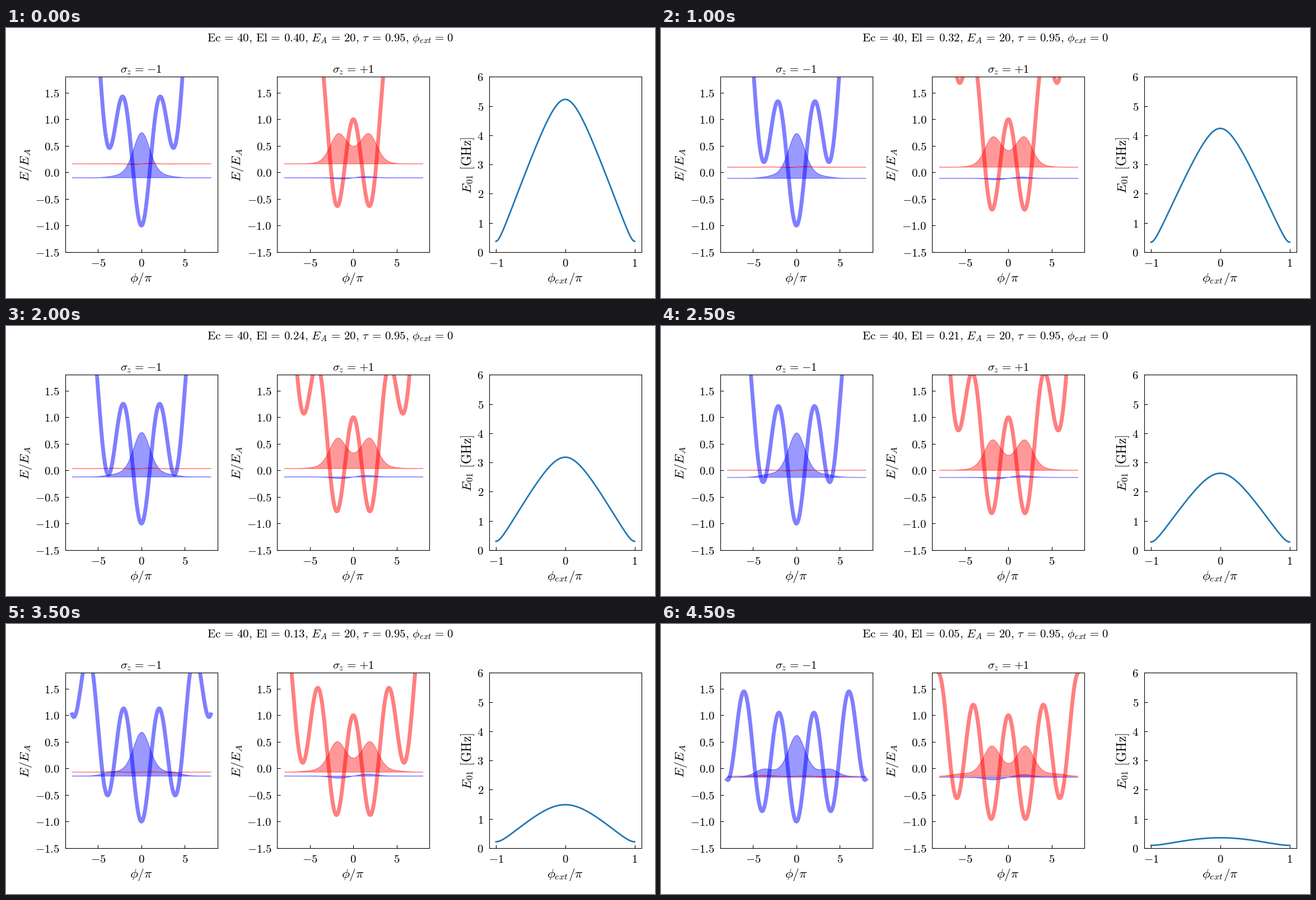
These frames come from a looping animation (1159x483 px, 5000 ms). A matplotlib script:

```python
import numpy as np
import matplotlib.pyplot as plt
from matplotlib.animation import FuncAnimation

W, H, DPI = 1159, 483, 100
FRAMES, INTERVAL = 10, 500

plt.rcParams["mathtext.fontset"] = "cm"

# Circuit parameters, energies in GHz
EC, EA, TAU = 40, 20, 0.95
EL_VALUES = np.linspace(0.40, 0.05, FRAMES)

# Sine basis in a box of half-width 8 pi
HALF, MODES = 8 * np.pi, 64
phi = np.linspace(-HALF, HALF, 401)
step = phi[1] - phi[0]
wave_k = np.arange(1, MODES + 1) * np.pi / (2 * HALF)
basis = np.sin(wave_k[:, None] * (phi + HALF)) / np.sqrt(HALF)


def operator(values):
    return (basis * values) @ basis.T * step


def both_spins(matrix):
    return np.kron(np.eye(2), matrix)


kinetic = np.diag(4 * EC * wave_k**2)
phi_1 = both_spins(operator(phi))
phi_2 = both_spins(operator(phi**2))
well = EA * operator(np.cos(phi / 2))
mixing = -EA * (1 - TAU) * operator(np.sin(phi / 2))
junction = np.block([[kinetic - well, mixing], [mixing, kinetic + well]])
identity = np.eye(2 * MODES)


def hamiltonian(el, flux):
    return junction + el / 2 * (phi_2 - 2 * flux * phi_1 + flux**2 * identity)


def eigenstates(el):
    """Two lowest levels, each with its (spin down, spin up) components."""
    energies, vectors = np.linalg.eigh(hamiltonian(el, 0))
    levels = []
    for n in range(2):
        parts = vectors[:, n].reshape(2, MODES) @ basis
        parts *= np.sign(parts[n].sum())
        levels.append((energies[n], parts))
    return levels


def transition(el, fluxes):
    stack = np.array([hamiltonian(el, f) for f in fluxes])
    energies = np.linalg.eigvalsh(stack)
    return energies[:, 1] - energies[:, 0]


half_flux = np.linspace(0, 1, 41)
flux_axis = np.concatenate([-half_flux[:0:-1], half_flux])
states = [eigenstates(el) for el in EL_VALUES]
gaps = []
for el in EL_VALUES:
    gap = transition(el, half_flux * np.pi)
    gaps.append(np.concatenate([gap[:0:-1], gap]))

# Layout
fig = plt.figure(figsize=(W / DPI, H / DPI), dpi=DPI, facecolor="white")
LEFT, PITCH, WIDTH = 105.7, 378.45, 272.3
TOP, BOTTOM = 87.3, 400.9

# Mathtext spaces are fractions of an italic m, which is 0.878 em wide
M_WIDTH = 0.878


def equals(gap):
    """Equals sign with the given space in em on both sides."""
    pad = rf"\hspace{{{gap / M_WIDTH - 0.2:.3f}}}"
    return f"{pad}={pad}"


SPACE = rf"\hspace{{{1 / 3 / M_WIDTH:.3f}}}"
EQ, TEXT_EQ = equals(0.278), equals(0.333)


def label(x, y, text, size=15, **kwargs):
    return fig.text(x / W, 1 - y / H, text, size=size, ha="center",
                    va="baseline", rotation_mode="anchor", **kwargs)


def number(value, digits):
    sign = "{-}" if value < 0 else ""
    return f"${sign}{abs(value):.{digits}f}$"


def panel(column, xlim, ylim, xticks, yticks, digits, xlabel, ylabel):
    left = LEFT + column * PITCH
    ax = fig.add_axes([left / W, 1 - BOTTOM / H, WIDTH / W, (BOTTOM - TOP) / H])
    ax.set(xlim=xlim, ylim=ylim)
    ax.set_xticks(xticks, [number(v, 0) for v in xticks])
    ax.set_yticks(yticks, [number(v, digits) for v in yticks])
    ax.tick_params(direction="in", pad=7, length=4, labelsize=15)
    label(left + WIDTH / 2 - 0.5, 454, xlabel, 16.8)
    label(left - (64.7 if digits else 31.2), 245, ylabel, 16.8, rotation=90)
    return ax


spin_axes = []
for column, sign in enumerate("-+"):
    ax = panel(column, (-8.8, 8.8), (-1.5, 1.8), [-5, 0, 5],
               np.arange(-1.5, 1.6, 0.5), 1, r"$\phi/\pi$", "$E/E_A$")
    label(LEFT + column * PITCH + WIDTH / 2, 80, rf"$\sigma_z{EQ}{{{sign}}}1$")
    spin_axes.append(ax)
flux_ax = panel(2, (-1.1, 1.1), (0, 6), [-1, 0, 1], range(7), 0,
                r"$\phi_{ext}/\pi$", rf"$E_{{01}}{SPACE}\mathrm{{[GHz]}}$")

COLORS = ("blue", "red")
wells = [ax.plot([], [], color=c, lw=5, alpha=0.5)[0]
         for ax, c in zip(spin_axes, COLORS)]
waves = [[ax.fill_between([0, 1], 0, 0, color=c, alpha=0.4, lw=1) for c in COLORS]
         for ax in spin_axes]
gap_line, = flux_ax.plot([], [], color="C0", lw=2)
heading = label(W / 2, 24.5, "")

x = phi / np.pi


def heading_text(el):
    terms = [rf"\mathrm{{Ec}}{TEXT_EQ}{EC}", rf"\mathrm{{El}}{TEXT_EQ}{el:.2f}",
             rf"E_A{TEXT_EQ}{EA}", rf"\tau{TEXT_EQ}{TAU}", rf"\phi_{{ext}}{EQ}0"]
    return "$" + ("{,}" + SPACE).join(terms) + "$"


def update(i):
    el = EL_VALUES[i]
    for spin, sign in enumerate((-1, 1)):
        wells[spin].set_data(x, el * phi**2 / (2 * EA) + sign * np.cos(phi / 2))
        for fill, (energy, parts) in zip(waves[spin], states[i]):
            base = energy / EA
            curve = np.column_stack([x, base + 2 * parts[spin]])
            floor = [(x[-1], base), (x[0], base)]
            fill.set_verts([np.vstack([curve, floor])])
    gap_line.set_data(flux_axis, gaps[i])
    heading.set_text(heading_text(el))
    return [*wells, *waves[0], *waves[1], gap_line, heading]


anim = FuncAnimation(fig, update, frames=FRAMES, interval=INTERVAL,
                     repeat=True, repeat_delay=0, blit=False)
plt.show()
```
